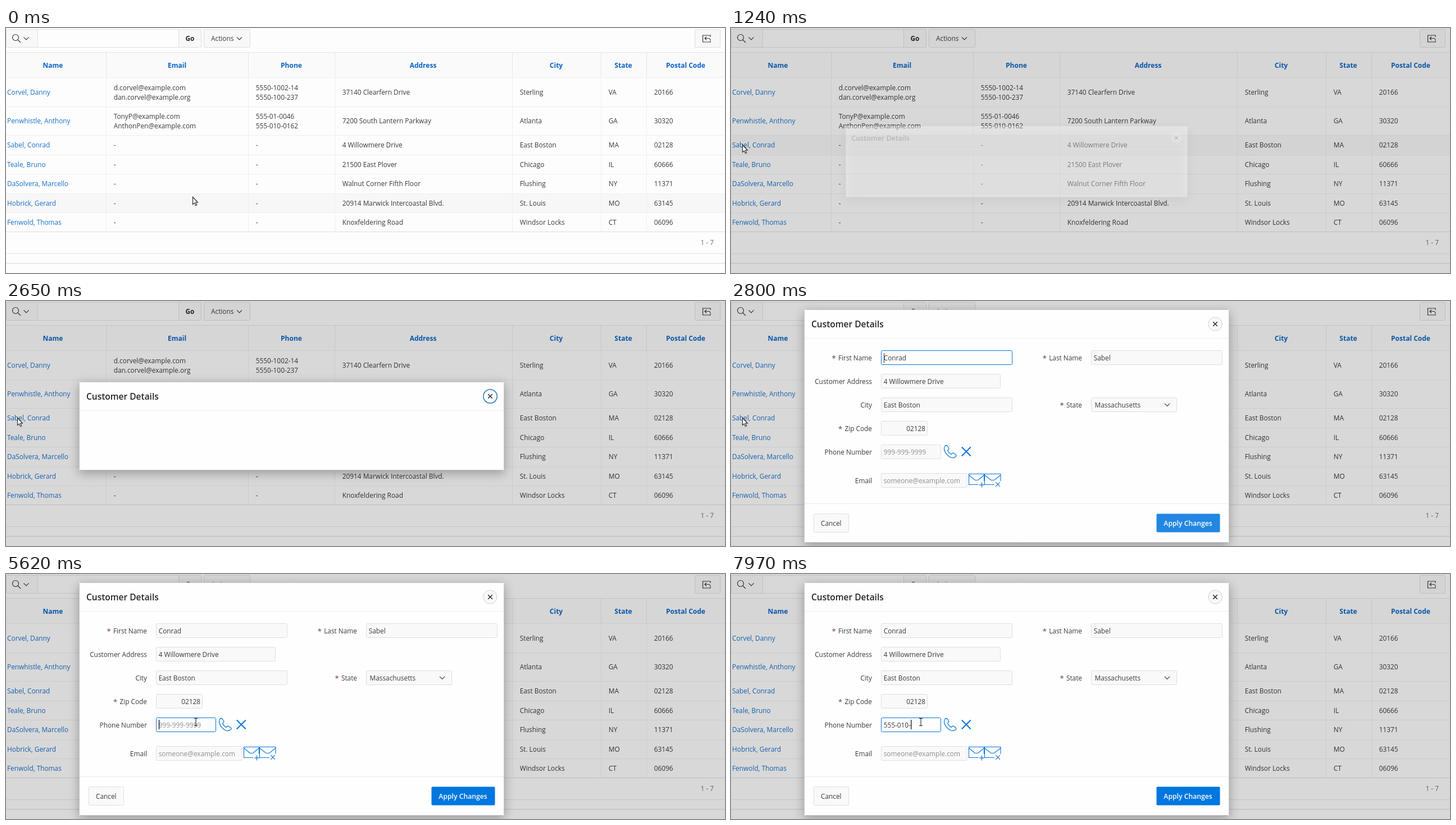
Write an HTML page with a canvas that moves like this. It is 1280 by 437 pixels and loops after 8 s.

```html
<!DOCTYPE html>
<html lang="en">
<head>
<meta charset="utf-8">
<title>Customer Details</title>
<style>
html, body { margin: 0; width: 100%; height: 100%; overflow: hidden; background: #fdfdfd; }
canvas { display: block; }
</style>
</head>
<body>
<canvas id="stage" width="1280" height="437"></canvas>
<script>
const c = document.getElementById('stage').getContext('2d');
const LOOP = 8000;
const FAMILY = '"Open Sans", "Noto Sans", sans-serif';
const INK = '#3a3a3a', LINK = '#1a70c9', HEAD = '#0a63c5', ACCENT = '#0a74d6';

const COLS = [0, 178.5, 431.5, 585.5, 901.5, 1059.5, 1140.5];
const HEADS = [['Name', 83.5], ['Email', 304.5], ['Phone', 508], ['Address', 742.5],
  ['City', 979.5], ['State', 1099], ['Postal Code', 1210]];
const ROW_Y = [88, 140, 191.5, 226, 260.5, 295, 329.5, 363.5];
const ROWS = [
  ['Corvel, Danny', 'd.corvel@example.com|dan.corvel@example.org', '5550-1002-14|5550-100-237', '37140 Clearfern Drive', 'Sterling', 'VA', '20166'],
  ['Penwhistle, Anthony', 'TonyP@example.com|AnthonPen@example.com', '555-01-0046|555-010-0162', '7200 South Lantern Parkway', 'Atlanta', 'GA', '30320'],
  ['Sabel, Conrad', '-', '-', '4 Willowmere Drive', 'East Boston', 'MA', '02128'],
  ['Teale, Bruno', '-', '-', '21500 East Plover', 'Chicago', 'IL', '60666'],
  ['DaSolvera, Marcello', '-', '-', 'Walnut Corner Fifth Floor', 'Flushing', 'NY', '11371'],
  ['Hobrick, Gerard', '-', '-', '20914 Marwick Intercoastal Blvd.', 'St. Louis', 'MO', '63145'],
  ['Fenwold, Thomas', '-', '-', 'Knoxfeldering Road', 'Windsor Locks', 'CT', '06096']
];

const TYPED = '555-010-';
const KEYS = [5940, 6090, 6240, 6720, 7190, 7340, 7490, 7970];

const TO_ROW = [[332, 301], [262, 277], [160, 243], [70, 221], [15, 209], [18, 209], [21, 208]];
const TO_PHONE = [[20, 208], [84, 219], [190, 238], [300, 257], [374, 264], [412, 265], [362, 263], [338, 264]];

const ARROW = new Path2D('M.5.5V13.6L3.5 10.9 5.6 15.6 7.7 14.7 5.7 10H9.4Z');
const HAND = new Path2D('M-1.7 1.8Q0-.8 1.6 1.8V6.4L6 7.6Q8 8.3 7.7 11L6.6 15.6V18.6H-1.4V16.4L-5.6 11.4Q-5.8 9-3.7 10L-1.7 12Z');
const HANDSET = new Path2D('M381 258.5Q379 261 379.5 265Q382 274 391 279Q396 281 400 277.5Q402 275.5 400 274L396.500 271.500Q395 270.500 393.500 272L392 273.500Q387.500 271 385.500 266.500L387 265Q388.500 263.500 387.500 262L385 258.500Q383 256.500 381 258.500Z');

function text(s, x, y, { color = INK, size = 11.85, weight = 400, align = 'left' } = {}) {
  c.font = `${weight} ${size}px ${FAMILY}`;
  c.fillStyle = color;
  c.textAlign = align;
  c.fillText(s, x, y);
  return c.measureText(s).width;
}

function line(color, width, ...pts) {
  c.strokeStyle = color;
  c.lineWidth = width;
  c.beginPath();
  for (let i = 0; i < pts.length; i += 2) c.lineTo(pts[i], pts[i + 1]);
  c.stroke();
}

function box(x, y, w, h, fill, stroke, r = 0) {
  c.beginPath();
  c.roundRect(x + .5, y + .5, w - 1, h - 1, r);
  c.fillStyle = fill;
  c.fill();
  if (stroke) {
    c.strokeStyle = stroke;
    c.lineWidth = 1;
    c.stroke();
  }
}

function circle(x, y, r, fill, stroke, width = 1) {
  c.beginPath();
  c.arc(x, y, r, 0, Math.PI * 2);
  if (fill) { c.fillStyle = fill; c.fill(); }
  c.strokeStyle = stroke;
  c.lineWidth = width;
  c.stroke();
}

const chevron = (x, y) => line(INK, 1.2, x - 4.5, y - 2.2, x, y + 2.3, x + 4.500, y - 2.2);

function cross(x, y, r, color, width) {
  line(color, width, x - r, y - r, x + r, y + r);
  line(color, width, x - r, y + r, x + r, y - r);
}

function toolbar() {
  box(0, 2, 57, 33, '#f8f8f8', '#dedede', 2);
  box(56, 2, 252, 33, '#fdfdfd', '#e2e2e2');
  box(307, 2, 41, 33, '#f8f8f8', '#dedede', 2);
  box(352, 2, 83, 33, '#f8f8f8', '#dedede', 2);
  box(1226, 2, 46, 33, '#f8f8f8', '#dedede', 2);
  circle(17, 17, 5.500, null, INK, 1.2);
  line(INK, 1.300, 21, 21, 26, 26);
  chevron(36, 18.5);
  text('Go', 327.5, 23, { weight: 700, align: 'center', color: '#262626' });
  text('Actions', 365, 23);
  chevron(415.5, 18.5);
  line(INK, 1.2, 1254, 16, 1254, 13, 1240.5, 13, 1240.5, 25, 1254, 25, 1254, 23);
  line(INK, 1.2, 1247, 15.5, 1244, 18.5, 1247, 21.5);
  c.beginPath();
  c.moveTo(1244, 18.5);
  c.lineTo(1251, 18.5);
  c.quadraticCurveTo(1254, 18.5, 1254, 22.5);
  c.stroke();
}

function table(hover) {
  c.fillStyle = '#fafafa';
  c.fillRect(0, 44, 1280, 44);
  if (hover >= 0) {
    c.fillStyle = '#f7f7f7';
    c.fillRect(0, ROW_Y[hover], 1280, ROW_Y[hover + 1] - ROW_Y[hover]);
  }
  line('#e4e4e4', 1, 0, 43.5, 1280, 43.5);
  ROW_Y.forEach((y, i) => {
    const py = Math.floor(y) + .5;
    line(i === 7 ? '#dedede' : '#efefef', 1, 0, py, 1280, py);
  });
  COLS.slice(1).forEach(x => {
    line('#e6e6e6', 1, x, 44, x, 88);
    line('#efefef', 1, x, 88, x, 363);
  });
  HEADS.forEach(([s, x]) => text(s, x, 70.5, { color: HEAD, weight: 700, size: 12, align: 'center' }));
  ROWS.forEach((row, r) => {
    const mid = (ROW_Y[r] + ROW_Y[r + 1]) / 2 + 4.7;
    row.forEach((cell, i) => {
      const x = i ? COLS[i] + 13.2 : 2;
      const parts = cell.split('|');
      parts.forEach((s, k) => text(s, x, mid + (parts.length > 1 ? k * 17 - 8.2 : 0), { color: i ? INK : LINK }));
    });
  });
  text('1 - 7', 1260, 387, { color: '#707070', align: 'right' });
  line('#e6e6e6', 1, 0, 402.5, 1280, 402.5);
  line('#dfdfdf', 1, 0, 419.5, 1280, 419.5);
  line('#f4f4f4', 1, 0, 420.5, 1280, 420.5);
}

function panel(top, height, closeFocus) {
  c.save();
  c.shadowColor = 'rgba(0,0,0,.3)';
  c.shadowBlur = 18;
  c.shadowOffsetY = 5;
  c.fillStyle = '#fefefe';
  c.fillRect(130, top, 757, height);
  c.restore();
  box(130, top, 757, height, '#fefefe', '#c6c6c6', 1);
  line('#efefef', 1, 131, top + 51.5, 886, top + 51.5);
  text('Customer Details', 143, top + 32, { size: 15.5, weight: 600, color: '#262626' });
  circle(862, top + 26, 12.2, closeFocus ? '#fefefe' : '#f8f8f8', closeFocus ? '#2a78bd' : '#d0d0d0', closeFocus ? 1.5 : 1);
  cross(862, top + 26, 3.8, '#262626', 1.5);
}

function field(x, y, w, value, o = {}) {
  box(x, y, w, 26, o.focus ? '#fefefe' : '#f9f9f9', o.focus ? ACCENT : '#dfdfdf', 2);
  if (o.right) text(value, x + w - 4, y + 17.5, { align: 'right' });
  else text(value, x + (o.pad || 4.7), y + 17.5, { color: o.hint ? '#8e8e8e' : INK });
}

function label(s, right, y, star) {
  const w = text(s, right, y, { align: 'right' });
  if (star) text('*', right - w - 11.5, y + 1, { color: star, size: 13 });
}

function envelope(x, w) {
  line(ACCENT, 1.1, x + w * .62, 327.5, x, 327.5, x, 308.5, x + w, 308.5, x + w, 321);
  line(ACCENT, 1.1, x, 310.5, x + w * .4, 319.5, x + w * .6, 319.5, x + w, 310.5);
}

function form(t) {
  const star = t < 2960 ? '#404040' : '#7a3b32';
  const onPhone = t >= 4530;
  label('First Name', 251, 105.5, star);
  label('Last Name', 625, 105.5, star);
  label('Customer Address', 251, 147.5);
  label('City', 251, 189.5);
  label('State', 625, 189.5, star);
  label('Zip Code', 251, 231.5, star);
  label('Phone Number', 251, 273.5);
  label('Email', 251, 324.5);

  field(267, 88, 234, 'Conrad', { focus: !onPhone });
  field(641, 88, 234, 'Sabel');
  field(267, 130, 213, '4 Willowmere Drive');
  field(267, 172, 234, 'East Boston');
  field(641, 172, 153, 'Massachusetts', { pad: 6.5 });
  chevron(776.5, 185);
  field(267, 214, 83, '02128', { right: true });

  const typed = TYPED.slice(0, KEYS.filter(k => t >= k).length);
  field(267, 256, 107, typed || '999-999-9999', { focus: onPhone, hint: !typed });
  field(267, 307, 154, 'someone@example.com', { hint: true });

  if (!onPhone && (t < 3260 || t >= 3887 && t < 4370)) line('#333', 1, 272.5, 93, 272.5, 110);
  if (t >= 4690 && t < 4990 || t >= 5620) {
    c.font = `400 11.85px ${FAMILY}`;
    const x = 272.5 + c.measureText(typed).width;
    line('#111', 1.3, x, 260, x, 277);
  }

  c.strokeStyle = ACCENT;
  c.lineWidth = 1.2;
  c.stroke(HANDSET);
  cross(418.8, 268.5, 8, ACCENT, 2);
  envelope(423.5, 27);
  envelope(451.5, 28.5);
  line(ACCENT, 1.2, 442, 328, 451, 328);
  line(ACCENT, 1.2, 446.5, 323.5, 446.5, 332.5);
  cross(475, 327, 3.8, ACCENT, 1.2);

  line('#ececec', 1, 131, 361.5, 886, 361.5);
  box(147, 379, 63, 34, '#f9f9f9', '#dfdfdf', 2);
  text('Cancel', 178.3, 400.5, { align: 'center' });
  box(757, 379, 114, 34, t < 2960 ? '#2287e2' : '#0076df', null, 2);
  text('Apply Changes', 813.5, 400.5, { align: 'center', weight: 600, size: 12.2, color: '#fff' });
}

function dialog(t) {
  if (t >= 2800) {
    panel(15, 416, false);
    form(t);
    return;
  }
  const p = t < 1393 ? 0 : t < 1547 ? .8 : 1;
  const s = .805 + .195 * p;
  c.save();
  c.globalAlpha = .2 + .8 * p;
  c.translate(508.5, 302);
  c.scale(s, s);
  c.translate(-508.5, -302);
  panel(144, 158, p === 1);
  c.restore();
}

// Pointer position holds between evenly spaced updates.
function stepAlong(path, t, start, end) {
  const n = path.length - 1;
  const i = Math.floor((t - start + 1) / ((end - start) / (n - 1))) + 1;
  return path[Math.max(0, Math.min(n, i))];
}

function pointer(t) {
  if (t < 1240) return stepAlong(TO_ROW, t, 140, 910);
  return stepAlong(TO_PHONE, t, 3260, 4200);
}

function drawPointer(x, y, kind) {
  if (kind === 'beam') {
    line('#333', 1.2, x, y - 6, x, y + 6);
    line('#333', 1.2, x - 3, y - 6.5, x + 3, y - 6.5);
    line('#333', 1.2, x - 3, y + 6.5, x + 3, y + 6.5);
    return;
  }
  const shape = kind === 'hand' ? HAND : ARROW;
  c.save();
  c.translate(x, y);
  c.fillStyle = '#fff';
  c.fill(shape);
  c.strokeStyle = '#222';
  c.lineWidth = 1.1;
  c.stroke(shape);
  if (kind === 'hand') {
    line('#222', .9, 1.6, 6.5, 1.6, 10);
    line('#222', .9, 4.4, 7.5, 4.4, 10.5);
  }
  c.restore();
}

function pointerKind(t, x, y) {
  if (t < 1240) return x < 84 && y < 216 ? 'hand' : 'arrow';
  if (y > 256 && x > 268 && x < 374) return 'beam';
  return y > 256 && x > 378 ? 'hand' : 'arrow';
}

function draw(t) {
  const [x, y] = pointer(t);
  const hover = t < 1393 ? ROW_Y.findIndex((top, i) => y >= top && y < ROW_Y[i + 1]) : -1;
  c.fillStyle = '#fdfdfd';
  c.fillRect(0, 0, 1280, 437);
  toolbar();
  table(hover);
  if (t >= 1240) {
    c.fillStyle = 'rgba(0,0,0,.145)';
    c.fillRect(0, 0, 1280, 437);
    dialog(t);
  }
  drawPointer(x, y, pointerKind(t, x, y));
}

const began = performance.now();
function tick() {
  draw((performance.now() - began) % LOOP);
  requestAnimationFrame(tick);
}
tick();
</script>
</body>
</html>
```
